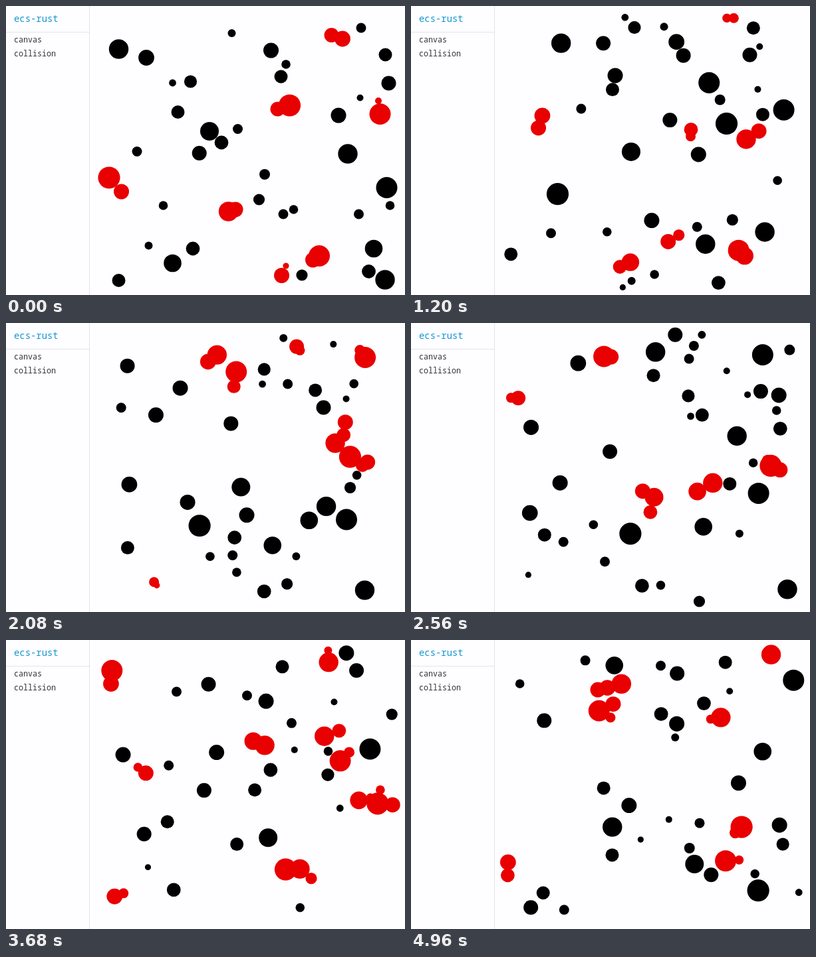
Recreate the animation shown at these times as an HTML page with a canvas. Size 600 by 436 pixels, loop 5000 ms.

```html
<!DOCTYPE html>
<html lang="en">
<head>
<meta charset="utf-8">
<title>ecs-rust</title>
<style>
  html, body { margin: 0; width: 100%; height: 100%; overflow: hidden; background: #fefdff; }
  canvas { position: absolute; left: 0; top: 0; }
  nav {
    position: absolute; left: 0; top: 0; width: 125px; height: 436px;
    border-right: 1px solid #e4e4ea;
    font: 11.7px/21px "Noto Sans Mono", "DejaVu Sans Mono", monospace; color: #333;
  }
  nav h1 {
    margin: 0; height: 39px; border-bottom: 1px solid #e4e4ea;
    font-size: 13.9px; line-height: 38px; font-weight: normal; color: #1696d2;
  }
  nav h1, nav div { padding-left: 12px; }
</style>
</head>
<body>
<canvas id="stage" width="600" height="436"></canvas>
<nav><h1>ecs-rust</h1><div>canvas</div><div>collision</div></nav>
<script>
const ctx = document.getElementById("stage").getContext("2d");
const LOOP = 5000, STEP = 40;
const LEFT = 131.6, RIGHT = 594, TOP = 5.2, BOTTOM = 429.2;
const balls = [];

// Each state is the starting x, y and the velocity in px/s.
function add(r, ...states) {
  for (const [x, y, vx, vy] of states) balls.push({ r, x, y, vx, vy });
}

add(16.6, [155, 259, -80.7, 25.2], [426.5, 150, 49, 28]);
add(16, [562.5, 163, -116.6, -48.2], [471, 377, 22.1, 82.4], [572.5, 274, 23.4, -119.7]);
add(14.7, [169.5, 65, -104.7, -9.1], [514, 223, -10.2, -22.5],
  [570, 413, 57.7, -73.5], [334.5, 310, 110.5, 50.2]);
add(14, [306, 189, 25.5, 31.6]);
add(13.3, [553, 366, -52.4, 90.6], [250.5, 388, 81, 58.4]);
add(11.9, [211, 78, -13.8, 89.3], [506, 49.5, -109, 4.8]);
add(11.5, [500, 165, 23.5, 24.2], [173.5, 280, -80.5, -98], [414.5, 406.5, -28.3, 75],
  [461.5, 383, -101.6, -60.7], [398.5, 67, -93.3, 38.7], [345, 307, 89.1, -84.8]);
add(11, [575.5, 116.5, 82.7, -43.6], [290.7, 222, 100.7, -50.9],
  [408.5, 155.5, -121.8, -101.2], [489.5, 44, -81.5, -88]);
add(10.4, [545.5, 400.5, -84.8, 17.4], [281, 366, 33.8, 79.7], [324, 206, 99, -20]);
add(10, [169.5, 414, -37.3, -40.4], [413.5, 106.5, 117.8, 58.3],
  [258.5, 160, 45.4, -34.6], [570.5, 73.5, -56.8, -77.9]);
add(9.6, [277.5, 114, 59.7, -83.2]);
add(8.6, [380.5, 292, 22.7, 54.8], [445, 406, 39.1, -85]);
add(8, [389, 254, 77.2, -114.8]);
add(7.5, [417, 314, 3.6, -119.7], [534, 33, -49.6, -26.4], [348.5, 185.5, -94.5, -31.1],
  [197, 219.5, 13.8, 125.7], [530.5, 314, -102.3, 19.7]);
add(6.8, [577.5, 301, -26.9, -38.5], [432.5, 307, -67.7, 100],
  [236.5, 301, 59.5, 40.5], [421, 88, 55.1, -83.9]);
add(6, [214.5, 361.5, 119.6, 71.6], [339.5, 41, 41.9, -9.9]);
add(5.4, [250.5, 116, 72.8, -100.8]);
add(5, [560, 143, -36.5, -83.4], [532.5, 138.5, -11.3, -13]);
add(4.6, [421, 392, -104.7, 33.1]);

// The simulation runs a little unevenly: [clock ms, simulated s].
const pace = [[0, 0], [1200, .98], [2080, 1.855], [3080, 2.857],
  [3680, 3.458], [4480, 4.212], [5000, 4.76]];

function simTime(ms) {
  const i = pace.findIndex(([end]) => ms < end);
  const [m0, s0] = pace[i - 1], [m1, s1] = pace[i];
  return s0 + (s1 - s0) * (ms - m0) / (m1 - m0);
}

// Folds straight motion into back-and-forth motion between two walls.
function bounce(p, lo, hi) {
  const span = hi - lo;
  const u = (((p - lo) % (2 * span)) + 2 * span) % (2 * span);
  return lo + (u > span ? 2 * span - u : u);
}

function draw(ms) {
  const s = simTime(ms);
  const now = balls.map(({ r, x, y, vx, vy }) => ({
    r,
    x: bounce(x + vx * s, LEFT + r, RIGHT - r),
    y: bounce(y + vy * s, TOP + r, BOTTOM - r)
  }));
  ctx.clearRect(0, 0, 600, 436);
  for (const a of now) {
    const hit = now.some(b => b !== a && Math.hypot(a.x - b.x, a.y - b.y) < a.r + b.r);
    ctx.fillStyle = hit ? "#e90000" : "#000";
    ctx.beginPath();
    ctx.arc(a.x, a.y, a.r, 0, 2 * Math.PI);
    ctx.fill();
  }
}

const start = performance.now();
function tick() {
  const ms = (performance.now() - start) % LOOP;
  draw(Math.floor(ms / STEP) * STEP);
  requestAnimationFrame(tick);
}
tick();
</script>
</body>
</html>
```
